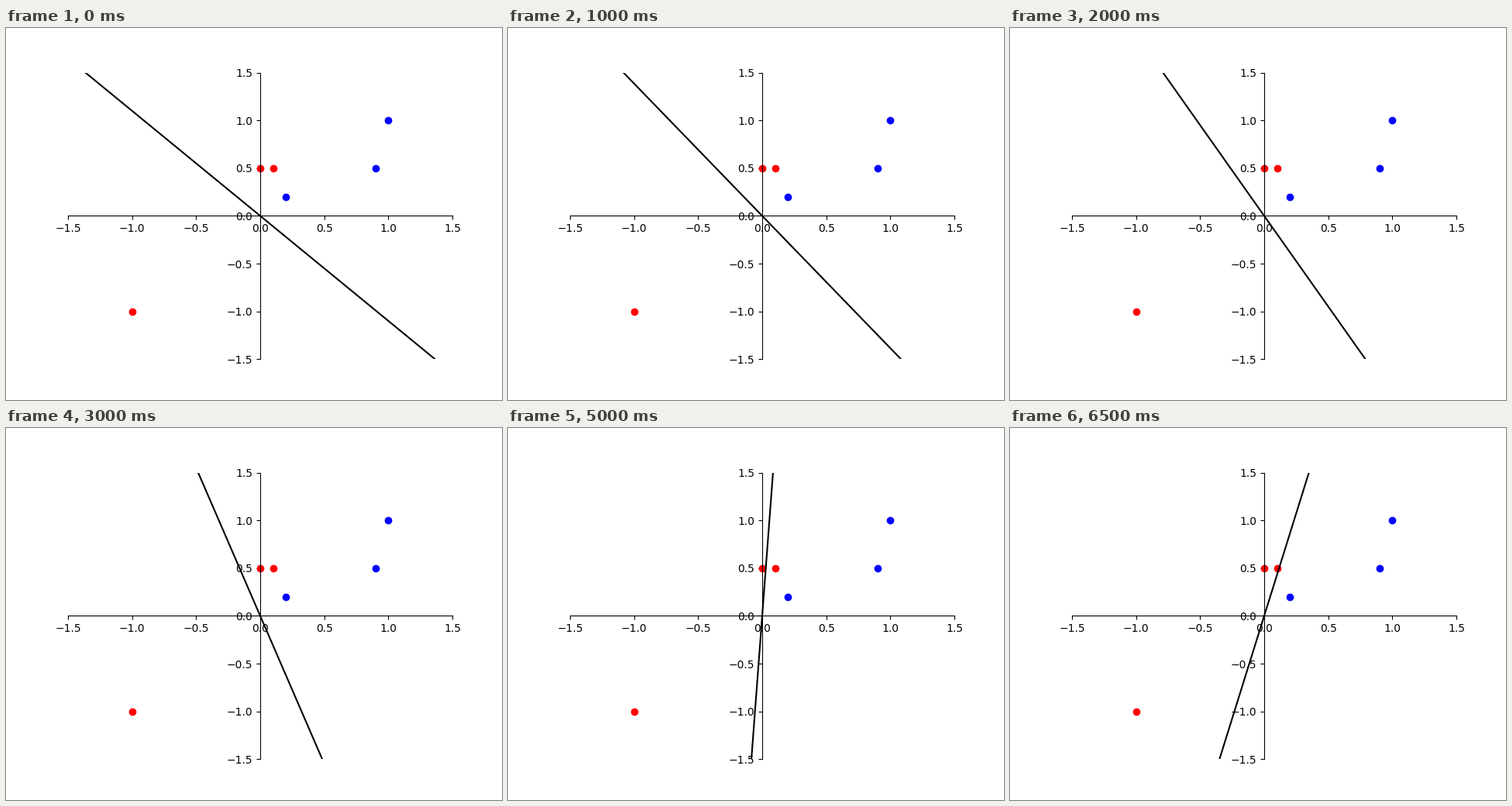
These frames come from a looping animation (640x480 px, 7500 ms). A matplotlib script:

```python
import matplotlib.pyplot as plt
import numpy as np
from matplotlib.animation import FuncAnimation

FRAMES = 15
STEP_MS = 500
LIMIT = 1.5

blue = np.array([(1, 1), (0.9, 0.5), (0.2, 0.2)])
red = np.array([(-1, -1), (0, 0.5), (0.1, 0.5)])

fig, ax = plt.subplots(figsize=(6.4, 4.8), dpi=100)
ax.set_xlim(-LIMIT, LIMIT)
ax.set_ylim(-LIMIT, LIMIT)
ticks = np.arange(-3, 4) / 2
ax.set_xticks(ticks)
ax.set_yticks(ticks)
for side in ("left", "bottom"):
    ax.spines[side].set_position("zero")
for side in ("right", "top"):
    ax.spines[side].set_visible(False)

ax.plot(*red.T, "o", color="red")
ax.plot(*blue.T, "o", color="blue")
boundary, = ax.plot([], [], color="black", lw=1.5)


def weights(step):
    """Perceptron weights: two red points correct them first, then only one."""
    step = min(step, 13)
    both = min(step, 9)
    single = step - both
    w1 = 0.99 - 0.01 * step
    w2 = (18 - 2 * both - single) / 20
    return w1, w2


def update(step):
    w1, w2 = weights(step)
    y = np.array([-2 * LIMIT, 2 * LIMIT])
    boundary.set_data(-w2 / w1 * y, y)
    return boundary,


anim = FuncAnimation(fig, update, frames=FRAMES, interval=STEP_MS,
                     init_func=lambda: update(0), repeat=True, repeat_delay=0)
plt.show()
```
